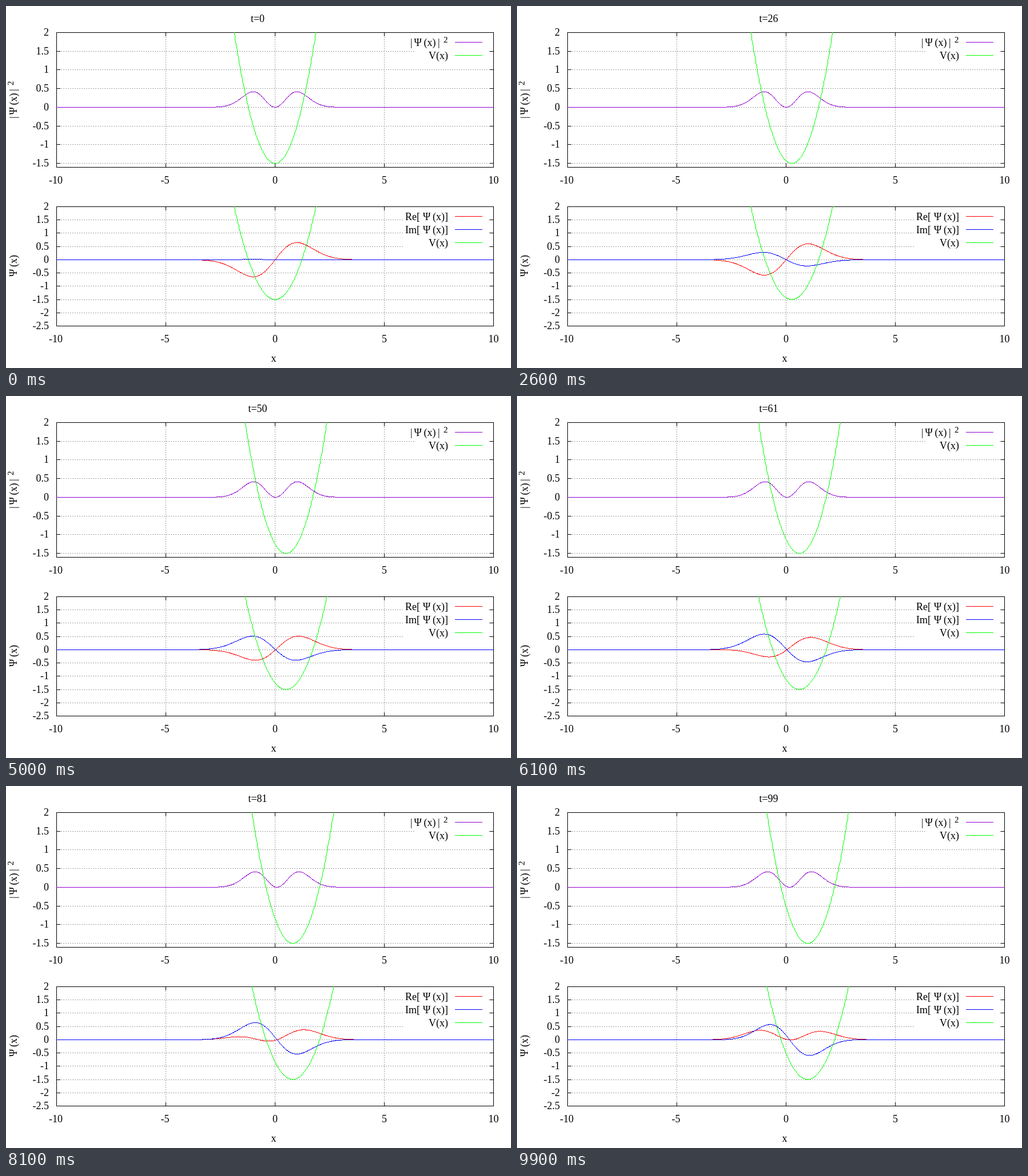
Animation, 883 px wide and 634 px high, one loop 10 s. Source, as an HTML page with a canvas:

```html
<!DOCTYPE html>
<html lang="en">
<head>
<meta charset="utf-8">
<title>Moving oscillator</title>
<style>
  html, body { margin: 0; width: 100%; height: 100%; overflow: hidden; background: #fff; }
  canvas, svg { position: absolute; left: 0; top: 0; width: 883px; height: 634px; }
  text { font: 18px "Liberation Serif", "Times New Roman", serif; fill: #000; white-space: pre; }
  .sup { font-size: 15px; }
</style>
</head>
<body>
<canvas id="plot" width="883" height="634"></canvas>
<svg id="labels" viewBox="0 0 883 634"></svg>
<script>
const ctx = document.getElementById('plot').getContext('2d');
const svg = document.getElementById('labels');

const LEFT = 88, RIGHT = 852;
const GREEN = '#00ff00', PURPLE = '#9400d3', RED = '#ff0000', BLUE = '#0000ff', GRID = '#a0a0a0';
// origin: exact height of the axis maximum, before rounding to pixel rows
const upper = { top: 46, bottom: 282, origin: 45.75, max: 2, min: -1.6, lowTick: -1.5,
                key: { left: 714, right: 842, bottom: 99 } };
const lower = { top: 351, bottom: 560, origin: 350.97, max: 2, min: -2.5, lowTick: -2.5,
                key: { left: 694, right: 842, bottom: 427 } };

const toX = x => Math.round(LEFT + (x + 10) / 20 * (RIGHT - LEFT));
const toY = (p, v) => Math.round(p.origin + (p.max - v) / (p.max - p.min) * (p.bottom - p.top));

function rect(color, x, y, w, h) {
  ctx.fillStyle = color;
  ctx.fillRect(x, y, w, h);
}

function add(parent, tag, attrs, content = '') {
  const el = document.createElementNS('http://www.w3.org/2000/svg', tag);
  for (const name in attrs) el.setAttribute(name, attrs[name]);
  el.textContent = content;
  return parent.appendChild(el);
}

const label = (content, x, y, anchor = 'start', parent = svg, cls = '') =>
  add(parent, 'text', { x, y, 'text-anchor': anchor, class: cls }, content);
const group = transform => add(svg, 'g', { transform });

function psiText(g, x = 0, tail = '') {
  label('Ψ', x + 1, 0, 'start', g);
  label('(x)' + tail, x + 18, 0, 'start', g);
}

function densityText(g) {
  label('|', 0, 0, 'start', g);
  psiText(g, 5.5);
  label('|', 48, 0, 'start', g);
  label('2', 58, -6, 'start', g, 'sup');
}

function drawFrame(p) {
  const { top, bottom, key } = p;
  const height = bottom - top;
  for (let v = p.max; v >= p.lowTick; v -= 0.5) {
    const y = toY(p, v);
    if (y > top && y < bottom) {
      for (let x = LEFT; x < RIGHT; x += 4) {
        const hidden = y < key.bottom && x >= key.left && x < key.right;
        if (!hidden) rect(GRID, x, y, 2, 1);
      }
    }
    rect('#000', LEFT, y, 7, 1);
    rect('#000', RIGHT - 6, y, 7, 1);
    label(String(v), 75, y + 6, 'end');
  }
  for (let v = -10; v <= 10; v += 5) {
    const x = toX(v);
    if (Math.abs(v) < 10) {
      for (let y = top; y < bottom; y += 4) rect(GRID, x, y, 1, 2);
    }
    rect('#000', x, top, 1, 7);
    rect('#000', x, bottom - 6, 1, 7);
    label(String(v), v < 0 ? x - 1 : x + 0.5, bottom + 29, 'middle');
  }
  rect('#000', LEFT, top, RIGHT - LEFT + 1, 1);
  rect('#000', LEFT, bottom, RIGHT - LEFT + 1, 1);
  rect('#000', LEFT, top, 1, height + 1);
  rect('#000', RIGHT, top, 1, height + 1);
}

const keyLine = (color, y) => rect(color, 785, y, 48, 1);

// Hard-edged one pixel line
function line(p, x0, y0, x1, y1) {
  const dx = Math.abs(x1 - x0), dy = -Math.abs(y1 - y0);
  const sx = Math.sign(x1 - x0), sy = Math.sign(y1 - y0);
  let err = dx + dy;
  for (;;) {
    if (y0 >= p.top && y0 <= p.bottom) ctx.fillRect(x0, y0, 1, 1);
    if (x0 === x1 && y0 === y1) return;
    const e2 = 2 * err;
    if (e2 >= dy) { err += dy; x0 += sx; }
    if (e2 <= dx) { err += dx; y0 += sy; }
  }
}

function curve(p, color, f, from = -10, to = 10) {
  ctx.fillStyle = color;
  const steps = Math.round((to - from) / 0.02);
  let px, py;
  for (let i = 0; i <= steps; i++) {
    const v = from + (to - from) * i / steps;
    const x = toX(v), y = toY(p, f(v));
    if (i) line(p, px, py, x, y);
    px = x;
    py = y;
  }
}

// First excited state carried along by a well moving at unit speed
function waveAt(T) {
  const center = T - Math.sin(T);
  const speed = 1 - Math.cos(T);
  const action = (T - 2 * Math.sin(T) + Math.sin(2 * T) / 2) / 2;
  const norm = Math.SQRT2 / Math.PI ** 0.25;
  const amp = x => norm * (x - center) * Math.exp(-((x - center) ** 2) / 2);
  const phase = x => speed * (x - center) + action - 1.5 * T;
  return {
    density: x => amp(x) ** 2,
    re: x => amp(x) * Math.cos(phase(x)),
    im: x => amp(x) * Math.sin(phase(x))
  };
}

rect('#fff', 0, 0, 883, 634);
drawFrame(upper);
drawFrame(lower);

densityText(group('translate(707 70)'));
label('V(x)', 773, 93, 'end');
keyLine(PURPLE, 63);
keyLine(GREEN, 86);

[['Re[', RED, 368], ['Im[', BLUE, 391]].forEach(([name, color, y]) => {
  const g = group(`translate(698 ${y + 7})`);
  label(name, 0, 0, 'start', g);
  psiText(g, 30, ']');
  keyLine(color, y);
});
label('V(x)', 773, 421, 'end');
keyLine(GREEN, 414);

densityText(group('translate(19 197) rotate(-90)'));
psiText(group('translate(19 475) rotate(-90)'));
label('x', 468, 623, 'middle');
const title = label('t=0', 440, 28, 'middle');

const backdrop = ctx.getImageData(0, 0, 883, 634);
let shown = -1;

function draw(t) {
  const well = t / 100;
  const wave = waveAt((t + 1) / 100);
  const V = x => (x - well) ** 2 - 1.5;
  ctx.putImageData(backdrop, 0, 0);
  curve(upper, PURPLE, wave.density);
  curve(upper, GREEN, V, -2, 4);
  curve(lower, RED, wave.re);
  curve(lower, BLUE, wave.im);
  curve(lower, GREEN, V, -2, 4);
  title.textContent = 't=' + t;
}

function tick() {
  const t = Math.floor(performance.now() / 100) % 100;
  if (t !== shown) draw(shown = t);
  requestAnimationFrame(tick);
}
tick();
</script>
</body>
</html>
```
